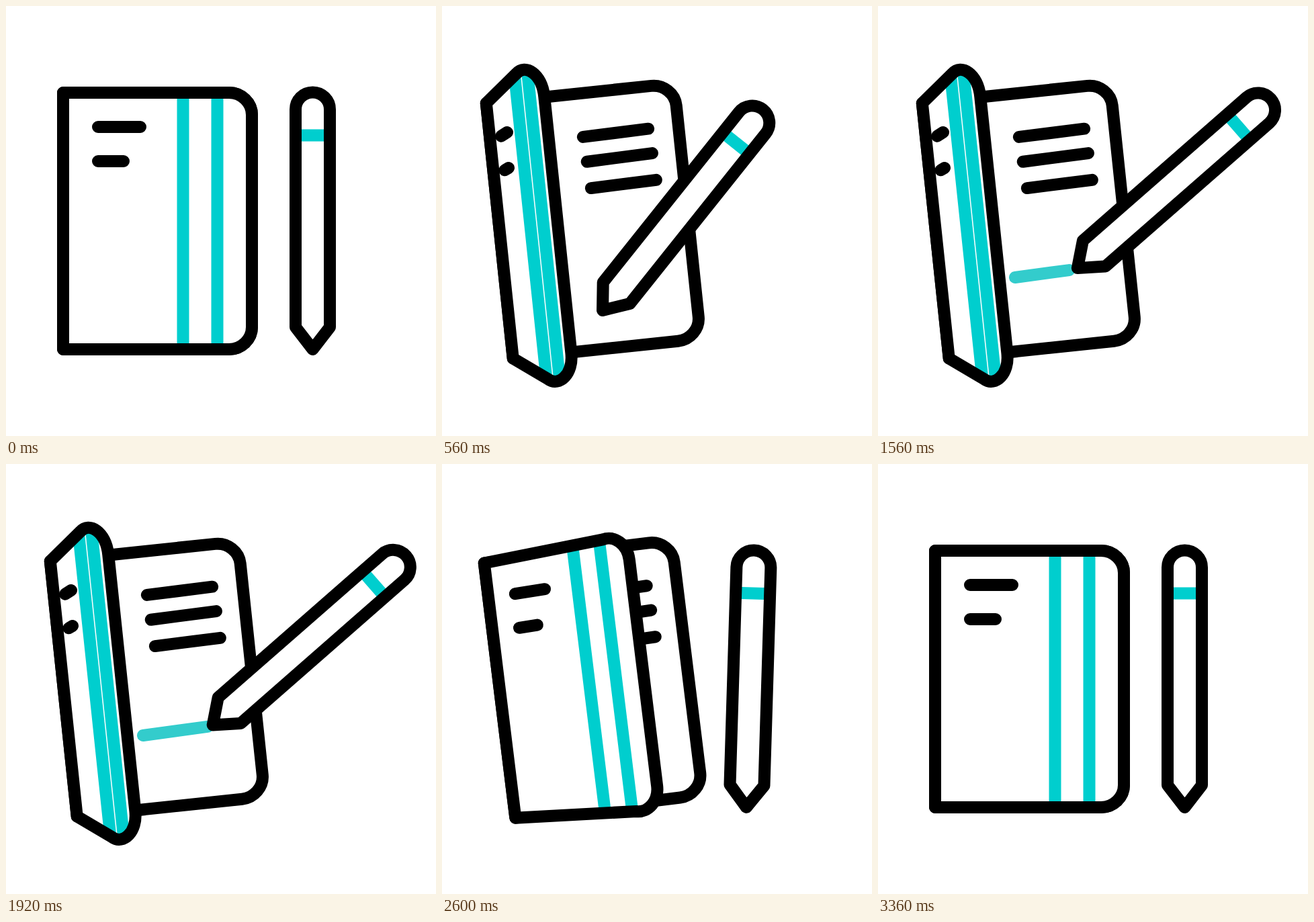
Recreate the animation shown at these times as an HTML page. Size 640 by 640 pixels, loop 4 s.

```html
<!DOCTYPE html>
<html lang="en">
<head>
<meta charset="utf-8">
<title>Notebook and pen</title>
<style>
  html, body { margin: 0; width: 100%; height: 100%; overflow: hidden; background: #fff; }
  svg { display: block; width: 100%; height: 100%; }
  .ink { fill: none; stroke: #000; stroke-width: 18; stroke-linecap: round; stroke-linejoin: round; }
  .paper { fill: #fff; }
  .band { fill: none; stroke: #00cece; stroke-width: 18; }
  .note { fill: none; stroke: #33cccc; stroke-width: 18; stroke-linecap: round; }
</style>
</head>
<body>
<svg viewBox="0 0 640 640">
  <defs><clipPath id="inside"><path id="clip"/></clipPath></defs>
  <g id="book">
    <path id="page" class="ink paper"/>
    <path class="ink" d="M-2-126L96-128M0-88.7L98-91.2M2-49L99.7-51"/>
    <path id="note" class="note"/>
    <path id="cover" class="paper"/>
    <path id="stripes" class="band" clip-path="url(#inside)"/>
    <path id="label" class="ink"/>
    <path id="edge" class="ink"/>
  </g>
  <g id="pen">
    <path class="paper" d="M-25.5 158V-166A25.5 25.5 0 0 1 25.5-166V158L0 191Z"/>
    <path class="band" d="M-25-127.5H25"/>
    <path class="ink" d="M-25.5 158V-166A25.5 25.5 0 0 1 25.5-166V158L0 191Z"/>
  </g>
</svg>
<script>
const LOOP = 4000, STEP = 40, LAST = 3360;
const $ = id => document.getElementById(id);
const mix = (a, b, k) => a + (b - a) * k;

// Smooth monotone curve through [time, value] keys, at rest at both ends
function track(keys) {
  const slope = i => (keys[i + 1][1] - keys[i][1]) / (keys[i + 1][0] - keys[i][0]);
  const tangent = i => {
    if (i === 0 || i === keys.length - 1) return 0;
    const a = slope(i - 1), b = slope(i);
    return a * b <= 0 ? 0 : 2 * a * b / (a + b);
  };
  return t => {
    if (t <= keys[0][0]) return keys[0][1];
    for (let i = 0; i < keys.length - 1; i++) {
      const [t0, v0] = keys[i], [t1, v1] = keys[i + 1];
      if (t > t1) continue;
      const d = t1 - t0, s = (t - t0) / d, e = s * s * (3 - 2 * s);
      return mix(v0, v1, e)
        + d * (s * (1 - s) * (1 - s) * tangent(i) - s * s * (1 - s) * tangent(i + 1));
    }
    return keys[keys.length - 1][1];
  };
}

const open = track([[0, 0], [420, 1], [2320, 1], [2600, .34], [2780, 0]]);
const tilt = track([[0, 0], [300, -3], [460, -7.1], [560, -6], [2280, -6],
  [2460, -10.2], [2600, -7], [2780, 0]]);
const written = track([[1180, 0], [1690, 1]]);
const penX = track([[0, 456.5], [560, 358.2], [820, 347.7], [1160, 347.7], [1660, 451.4],
  [1950, 451.4], [2280, 465.3], [2600, 458.8], [2700, 456.5]]);
const penY = track([[0, 320], [560, 303.7], [820, 278.2], [1160, 278.2], [1660, 262.7],
  [1950, 262.7], [2280, 288.8], [2600, 320], [2700, 320]]);
const penTurn = track([[0, 0], [560, 38.6], [820, 48.8], [1950, 48.8],
  [2280, 28.9], [2600, 1.75], [2700, 0]]);

// Rounded corner of the cover: closed [x, y], then open [x, y]
const corner = [
  [107, 191, -91, 230], [125.5, 191, -76, 244],
  [141, 176, -53, 226], [141, 158, -53, 192]
];

function outline(k) {
  const top = corner.map(([x, y, X, Y]) => [mix(x, X, k), -mix(y, Y, k)]);
  const low = corner.map(([x, y, X, Y]) => [mix(x, X, k), mix(y, 191 + (Y - 191) * .93, k)]).reverse();
  return `M-140-191L${top[0]}C${top.slice(1).join(" ")}L${low[0]}C${low.slice(1).join(" ")}L-140 191Z`;
}

function stripes(k) {
  return [mix(38.5, -93.7, k), mix(89.5, -74.2, k)].map(x => `M${x}-260V260`).join("");
}

function label(k) {
  const left = mix(-88, -123, k);
  return `M${left}-140L${mix(-25, -113.5, k)} ${mix(-140, -144.7, k)}`
    + `M${left}-89L${mix(-50, -117, k)} ${mix(-89, -91.8, k)}`;
}

function draw(t) {
  const k = open(t), w = written(t), shape = outline(k);
  for (const id of ["cover", "clip", "edge"]) $(id).setAttribute("d", shape);
  $("stripes").setAttribute("d", stripes(k));
  $("label").setAttribute("d", label(k));
  $("book").setAttribute("transform", `translate(225 320) rotate(${tilt(t)})`);
  $("note").setAttribute("d", `M-29.7 81.3L${mix(-29.7, 67.2, w)} ${mix(81.3, 78.4, w)}`);
  $("note").style.display = w > 0 && t < 2640 ? "" : "none";
  $("pen").setAttribute("transform", `translate(${penX(t)} ${penY(t)}) rotate(${penTurn(t)})`);
}

$("page").setAttribute("d", outline(0));
const start = performance.now();
function tick() {
  const t = (performance.now() - start) % LOOP;
  draw(Math.min(Math.floor(t / STEP) * STEP, LAST));
  requestAnimationFrame(tick);
}
draw(0);
requestAnimationFrame(tick);
</script>
</body>
</html>
```
